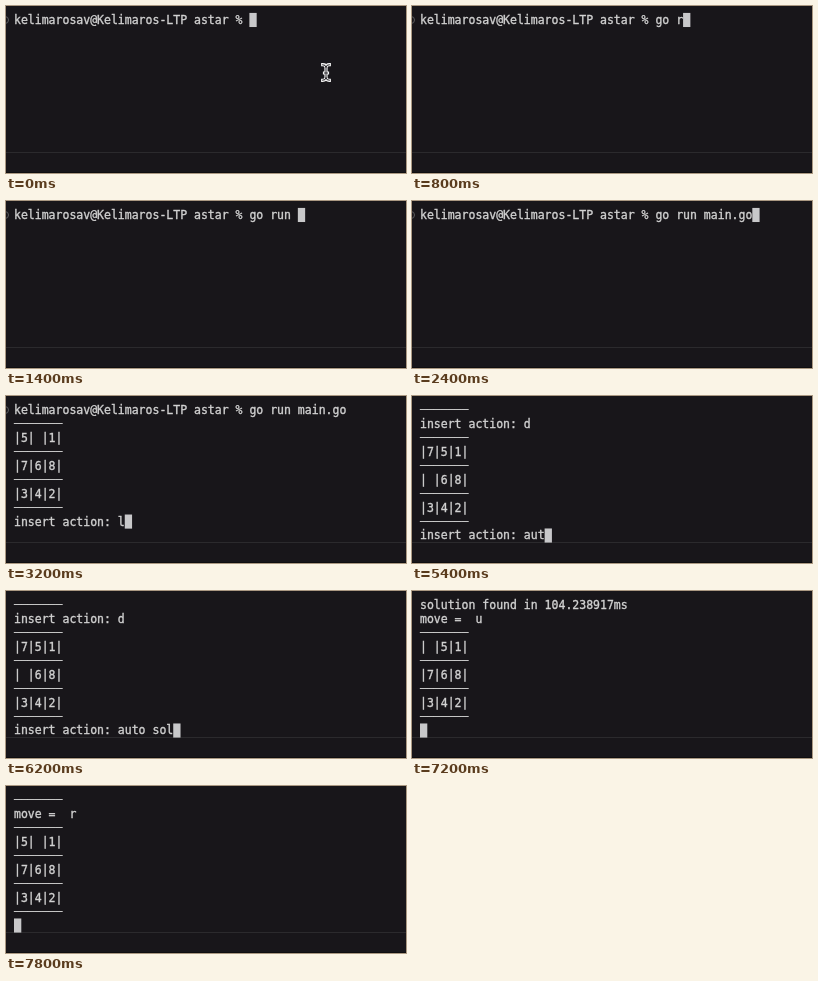
An HTML page that plays this animation: 400x167 px, repeating every 8 s.

```html
<!DOCTYPE html>
<html lang="en">
<head>
<meta charset="utf-8">
<title>Sliding puzzle in a terminal</title>
<style>
  html, body { margin: 0; width: 100%; height: 100%; overflow: hidden; background: #18161a; }
  #stage { position: relative; width: 400px; height: 167px; overflow: hidden; background: #18161a; }
  .row {
    position: absolute; left: 8px; height: 14px; white-space: pre;
    font: 11.5px/14px "DejaVu Sans Mono", Menlo, monospace; color: #d2d2d2;
    -webkit-text-stroke: 0.35px #d2d2d2;
  }
  .rule { margin-top: -1px; }
  #divider { position: absolute; left: 0; top: 146px; width: 400px; height: 1px; background: #2b2a2d; }
  #edge { position: absolute; left: 0; top: 166px; width: 400px; height: 1px; background: #0e0e10; }
  #mark {
    position: absolute; left: -5px; top: 10px; width: 6px; height: 6px;
    border: 1px solid #5c5c5e; border-radius: 50%;
  }
  #overlay { position: absolute; left: 0; top: 0; }
</style>
</head>
<body>
<div id="stage">
  <div id="divider"></div>
  <div id="edge"></div>
  <div id="mark"></div>
  <svg id="overlay" width="400" height="167">
    <defs>
      <path id="beam" d="M2.7 2.7Q6 2.7 6 5.5Q6 2.7 9.3 2.7M6 5V16M2.7 18.3Q6 18.3 6 15.5Q6 18.3 9.3 18.3M4.5 11H7.5"/>
    </defs>
    <rect id="caret" width="7.3" height="14.1" fill="#c8c8ca"/>
    <g id="pointer" transform="translate(314 56)" fill="none" stroke-linecap="square">
      <use href="#beam" stroke="#f4f4f4" stroke-width="3.2"/>
      <use href="#beam" stroke="#18161a" stroke-width="0.9"/>
    </g>
  </svg>
</div>
<script>
const LOOP = 8000, LEFT = 8, TOP = 6.92, PITCH = 13.95, CHAR = 6.923, ROWS = 10;
const RULE = "—".repeat(7);
const SHELL = "kelimarosav@Kelimaros-LTP astar % ";
const ASK = "insert action: ";

const $ = id => document.getElementById(id);
const stage = $("stage"), overlay = $("overlay");
const caret = $("caret"), mark = $("mark"), pointer = $("pointer");

// Each board is three strings of tiles, top to bottom.
const board = (...lines) =>
  [RULE, ...lines.flatMap(line => ["|" + [...line].join("|") + "|", RULE])];

const start = board("5 1", "768", "342");
const left = board(" 51", "768", "342");
const down = board("751", " 68", "342");

// The last line of each screen is where typing happens.
const screens = {
  shell: [SHELL],
  first: [SHELL + "go run main.go", ...start, ASK],
  second: [RULE, ASK + "l", ...left, ASK],
  third: [RULE, ASK + "d", ...down, ASK],
  moveUp: ["solution found in 104.238917ms", "move =  u", ...left, ""],
  moveRight: [RULE, "move =  r", ...start, ""]
};

// time, screen, typed text
const steps = [
  [0, "shell", ""],
  [200, "shell", "g"],
  [400, "shell", "go"],
  [600, "shell", "go "],
  [800, "shell", "go r"],
  [1000, "shell", "go ru"],
  [1200, "shell", "go run"],
  [1400, "shell", "go run "],
  [1600, "shell", "go run m"],
  [1800, "shell", "go run ma"],
  [2000, "shell", "go run mai"],
  [2200, "shell", "go run main"],
  [2400, "shell", "go run main.go"],
  [2800, "first", ""],
  [3200, "first", "l"],
  [3800, "second", ""],
  [4200, "second", "d"],
  [4800, "third", ""],
  [5200, "third", "au"],
  [5400, "third", "aut"],
  [5600, "third", "auto "],
  [5800, "third", "auto s"],
  [6000, "third", "auto so"],
  [6200, "third", "auto sol"],
  [6400, "third", "auto solv"],
  [6600, "third", "auto solve"],
  [7200, "moveUp", ""],
  [7800, "moveRight", ""]
];

const rows = Array.from({ length: ROWS }, (_, i) => {
  const row = document.createElement("div");
  row.className = "row";
  row.style.top = TOP + i * PITCH + "px";
  stage.insertBefore(row, overlay);
  return row;
});

let shown = null;

function draw(time) {
  const step = steps.findLast(s => s[0] <= time);
  if (step === shown) return;
  shown = step;
  const [at, name, typed] = step;
  const lines = screens[name], last = lines.length - 1;
  rows.forEach((row, i) => {
    row.textContent = (lines[i] || "") + (i === last ? typed : "");
    row.classList.toggle("rule", lines[i] === RULE);
  });
  caret.setAttribute("x", LEFT + (lines[last].length + typed.length) * CHAR);
  caret.setAttribute("y", TOP + last * PITCH);
  mark.hidden = !lines[0].startsWith(SHELL);
  pointer.style.visibility = at === 0 ? "visible" : "hidden";
}

const origin = performance.now();
function tick() {
  draw((performance.now() - origin) % LOOP);
  requestAnimationFrame(tick);
}
tick();
</script>
</body>
</html>
```
